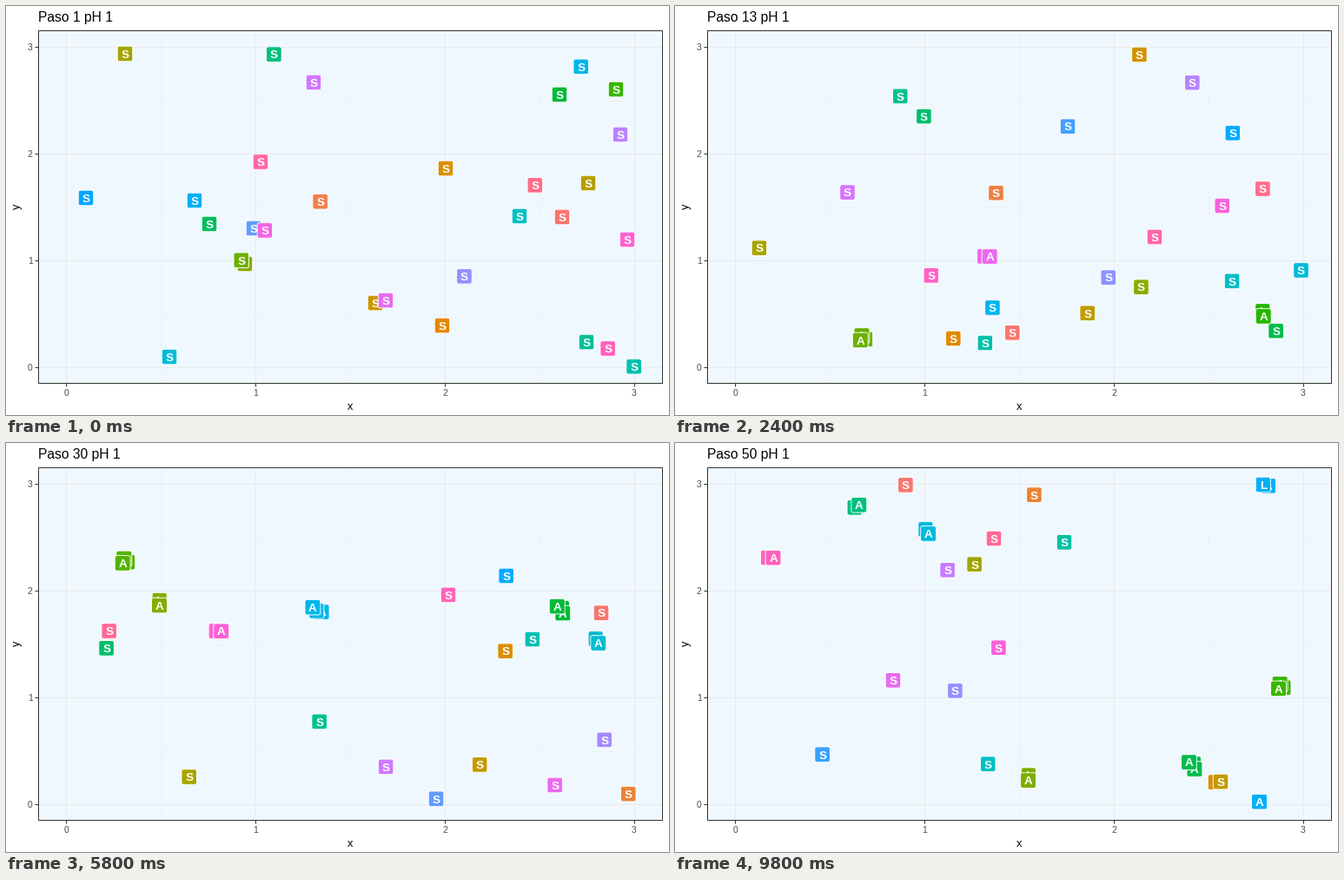
A matplotlib script that plays this animation: 763 by 471 pixels, repeating every 10 s.

```python
import numpy as np
import matplotlib.pyplot as plt
from matplotlib.animation import FuncAnimation
from matplotlib.patches import FancyBboxPatch, Rectangle

WIDTH, HEIGHT, DPI = 763, 471, 100
STEPS, INTERVAL = 50, 200
UNIT = np.array([217.8, 123.1])        # pixels per data unit
CORNER = np.array([69.4, 47.0])        # pixel place of x = 0, y = 3
SPAN = 3 * UNIT
FONT = "Liberation Sans"
POINT = 72 / DPI                       # points per pixel

COUNT = 30
# follower: leader, in the order in which they meet
BONDS = {9: 8, 15: 10, 26: 25, 13: 8, 22: 7, 29: 10, 28: 17, 18: 16, 2: 17, 30: 11}
MEET_EVERY = 3.5
REACH = 6                              # pixels between bonded centres

# leaders and loners: start x, start y, drift x, drift y over the loop
DRIFTERS = np.array([
    (640, 243, -1028, 544), (502, 368, -742, 61), (506, 187, 116, -535),
    (425, 342, 203, 48), (670, 204, 328, 305), (137, 55, -1037, -411),
    (275, 297, -228, 354), (702, 96, -105, -465), (637, 102, 223, -397),
    (234, 251, 214, -506), (668, 387, 999, 352), (591, 242, -956, 596),
    (188, 404, -818, -356), (217, 224, 606, 504), (92, 221, -423, -305),
    (285, 256, 682, -479), (707, 148, -456, -244), (354, 88, -635, 517),
    (437, 339, -330, -207), (715, 269, -348, -159),
])


def build_motion():
    """Start, speed, leader and meeting step of every particle."""
    rng = np.random.default_rng(7)
    start, speed = np.zeros((COUNT, 2)), np.zeros((COUNT, 2))
    lead, meet = np.arange(COUNT), np.full(COUNT, STEPS)
    free = [i for i in range(COUNT) if i + 1 not in BONDS]
    start[free] = DRIFTERS[:, :2]
    speed[free] = DRIFTERS[:, 2:] / (STEPS - 1)
    for k, (follower, leader) in enumerate(BONDS.items()):
        f, l = follower - 1, leader - 1
        lead[f], meet[f] = l, int(MEET_EVERY * k)
        angle = rng.uniform(0, 2 * np.pi)
        gap = REACH * np.array([np.cos(angle), np.sin(angle)])
        speed[f] = rng.uniform(-0.1, 0.1, 2) * UNIT
        start[f] = start[l] + gap + (speed[l] - speed[f]) * meet[f]
    return start, speed, lead, meet


START, SPEED, LEAD, MEET = build_motion()


def hue_color(hue, chroma=100, light=65):
    """Polar LUV to clipped sRGB."""
    u = chroma * np.cos(np.radians(hue))
    v = chroma * np.sin(np.radians(hue))
    y = ((light + 16) / 116) ** 3
    u = u / (13 * light) + 0.19784
    v = v / (13 * light) + 0.46834
    x = 9 * y * u / (4 * v)
    z = y * (12 - 3 * u - 20 * v) / (4 * v)
    lin = np.array([3.240479 * x - 1.537150 * y - 0.498535 * z,
                    -0.969256 * x + 1.875992 * y + 0.041556 * z,
                    0.055648 * x - 0.204043 * y + 1.057311 * z])
    gamma = 1.055 * np.maximum(lin, 0.0031308) ** (1 / 2.4) - 0.055
    return np.clip(np.where(lin > 0.0031308, gamma, 12.92 * lin), 0, 1)


def state(step):
    """Positions, letters and fill colours at one step."""
    alone = np.minimum(step, MEET)[:, None]
    pos = START + SPEED * alone + SPEED[LEAD] * (step - alone)
    bonded = step > MEET
    group = np.where(bonded, LEAD, np.arange(COUNT))
    letters = np.where(bonded, "A", "S")
    letters[LEAD[bonded]] = "L"
    groups, rank = np.unique(group, return_inverse=True)
    colors = [hue_color(15 + 360 * r / len(groups)) for r in rank]
    return (pos - CORNER) % SPAN + CORNER, letters, colors


fig = plt.figure(figsize=(WIDTH / DPI, HEIGHT / DPI), dpi=DPI, facecolor="white")
ax = fig.add_axes([0, 0, 1, 1])
ax.set_xlim(0, WIDTH)
ax.set_ylim(HEIGHT, 0)
ax.axis("off")


def write(x, y, text, px, color="black", **kw):
    kw = {"ha": "center", "va": "baseline", **kw}
    return ax.text(x, y, text, fontsize=px * POINT, family=FONT, color=color, **kw)


def line(xs, ys, color, px):
    ax.plot(xs, ys, color=color, lw=px * POINT, zorder=1, solid_capstyle="butt")


def draw_panel():
    x0, y0 = CORNER - 0.05 * SPAN - (0, 0.7)
    w, h = 1.1 * SPAN
    x1, y1 = x0 + w, y0 + h
    ax.add_patch(Rectangle((x0, y0), w, h, fc="#F0F8FF", ec="none", zorder=0))
    for value in np.arange(0, 3.1, 0.5):
        x = CORNER[0] + value * UNIT[0]
        y = CORNER[1] + (3 - value) * UNIT[1]
        major = value % 1 == 0
        weight = 1.1 if major else 0.5
        line([x, x], [y0, y1], "#EBEBEB", weight)
        line([x0, x1], [y, y], "#EBEBEB", weight)
        if major:
            line([x, x], [y1, y1 + 3.5], "#333333", 1)
            line([x0 - 3.5, x0], [y, y], "#333333", 1)
            write(x, y1 + 14.7, f"{value:.0f}", 10.4, "#4D4D4D")
            write(x0 - 6, y + 3.8, f"{value:.0f}", 10.4, "#4D4D4D", ha="right")
    ax.add_patch(Rectangle((x0, y0), w, h, fill=False, ec="#333333",
                           lw=POINT, zorder=100))
    write((x0 + x1) / 2, 465, "x", 12.8)
    write(13, (y0 + y1) / 2, "y", 12.8, va="center", rotation=90)
    return x0


title = write(draw_panel(), 18, "", 15.6, ha="left")

BOX_W = {"S": 17.5, "A": 17.9, "L": 17.1}
BOX_H = 17.6
boxes, marks = [], []
for k in range(COUNT):
    box = FancyBboxPatch((0, 0), BOX_H, BOX_H, ec="white", lw=0.9 * POINT,
                         boxstyle="round,pad=0,rounding_size=2.3", zorder=2 + 2 * k)
    boxes.append(ax.add_patch(box))
    marks.append(write(0, 0, "S", 13.4, "white", weight="bold", zorder=3 + 2 * k))


def update(step):
    title.set_text(f"Paso {step + 1} pH 1")
    for (x, y), letter, color, box, mark in zip(*state(step), boxes, marks):
        w = BOX_W[letter]
        box.set_bounds(x - w / 2, y - BOX_H / 2, w, BOX_H)
        box.set_facecolor(color)
        mark.set_position((x, y + 4.8))
        mark.set_text(letter)
    return [title, *boxes, *marks]


anim = FuncAnimation(fig, update, frames=STEPS, interval=INTERVAL,
                     init_func=lambda: update(0), repeat=True, repeat_delay=0)
plt.show()
```
